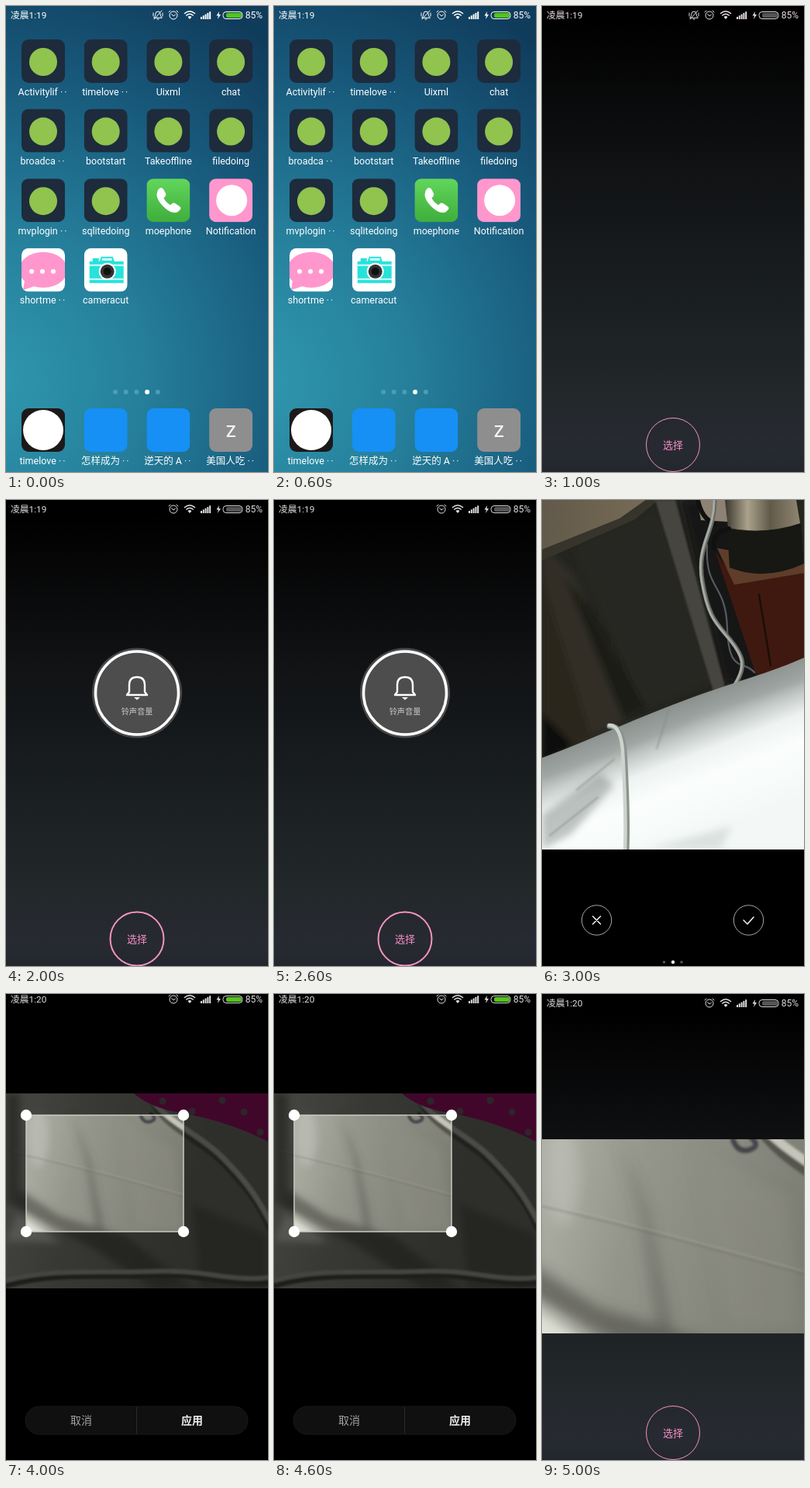
Recreate the animation shown at these times as an HTML page. Size 338 px wide and 600 px high, loop 6 s.

```html
<!DOCTYPE html>
<html lang="zh">
<head>
<meta charset="utf-8">
<title>Photo crop demo</title>
<style>
  html, body { margin: 0; width: 100%; height: 100%; overflow: hidden; background: #000; }
  svg { display: block; width: 100%; height: 100%; }
  text { font-family: Roboto, "Noto Sans CJK SC", "Noto Sans CJK", sans-serif; text-anchor: middle; }
  .line { fill: none; stroke-linecap: round; stroke-linejoin: round; }
  .dots { letter-spacing: 2px; }
</style>
</head>
<body>
<svg id="stage" viewBox="0 0 338 600">
  <defs>
    <radialGradient id="wallpaper" gradientUnits="userSpaceOnUse" cx="-20" cy="480" r="560">
      <stop offset="0" stop-color="#3098ae"/>
      <stop offset=".35" stop-color="#257f9b"/>
      <stop offset=".7" stop-color="#185a7c"/>
      <stop offset="1" stop-color="#103c5c"/>
    </radialGradient>
    <linearGradient id="night" x2="0" y2="1">
      <stop offset=".03" stop-color="#000"/>
      <stop offset=".35" stop-color="#111214"/>
      <stop offset=".5" stop-color="#15191c"/>
      <stop offset=".85" stop-color="#23282b"/>
      <stop offset=".95" stop-color="#272a32"/>
      <stop offset="1" stop-color="#23272d"/>
    </linearGradient>
    <linearGradient id="phone" x2="0" y2="1">
      <stop stop-color="#62d65c"/><stop offset="1" stop-color="#3eae3c"/>
    </linearGradient>
    <linearGradient id="bed" gradientUnits="userSpaceOnUse" x1="169" y1="265" x2="230" y2="425">
      <stop stop-color="#8b918e"/>
      <stop offset=".16" stop-color="#a9afac"/>
      <stop offset=".4" stop-color="#eef3f1"/>
      <stop offset=".6" stop-color="#fbfefd"/>
      <stop offset="1" stop-color="#f3f8f6"/>
    </linearGradient>
    <linearGradient id="wood">
      <stop stop-color="#61594a"/><stop offset="1" stop-color="#766b55"/>
    </linearGradient>
    <linearGradient id="steel">
      <stop stop-color="#3b372e"/><stop offset=".3" stop-color="#aaa28c"/>
      <stop offset=".6" stop-color="#615a49"/><stop offset="1" stop-color="#8f8670"/>
    </linearGradient>
    <linearGradient id="sheet" gradientUnits="userSpaceOnUse" x1="20" y1="180" x2="240" y2="240">
      <stop stop-color="#b0b1a7"/><stop offset=".35" stop-color="#95968b"/>
      <stop offset="1" stop-color="#7a7b71"/>
    </linearGradient>
    <filter id="soft" x="-30%" y="-30%" width="160%" height="160%"><feGaussianBlur stdDeviation="5"/></filter>
    <filter id="slight" x="-30%" y="-30%" width="160%" height="160%"><feGaussianBlur stdDeviation="1"/></filter>
    <clipPath id="tile"><rect width="56" height="56" rx="9"/></clipPath>
    <clipPath id="roomFrame"><path d="M0 0H338V450H0Z"/></clipPath>
    <clipPath id="fullFrame"><path d="M0 128H338V379H0Z"/></clipPath>
    <clipPath id="cropFrame"><path d="M0 187H338V437H0Z"/></clipPath>

    <g id="cloth">
      <path d="M0 128H338V379H0Z" fill="url(#sheet)"/>
      <g filter="url(#soft)">
        <ellipse cx="42" cy="185" rx="13" ry="38" fill="#ced0c7" opacity=".4"/>
        <path d="M18 252L70 286 155 312 240 379H190L110 326 15 276Z" fill="#50514a" opacity=".65"/>
        <path d="M15 282L40 298 70 320 0 318Z" fill="#e0e2d8"/>
        <path d="M82 150L102 210 116 306 128 306 108 210Z" fill="#55564f" opacity=".45"/>
        <path d="M145 165L170 300 230 306 215 200Z" fill="#8f9084" opacity=".4"/>
        <path d="M0 128H18V275L0 270ZM240 270L338 310V379H250Z" fill="#54564e" opacity=".6"/>
      </g>
      <g class="line" filter="url(#slight)">
        <path d="M10 202Q100 222 229 258" stroke="#c0c1b6" stroke-width="1.3" opacity=".25"/>
        <path d="M10 204Q100 224 229 260" stroke="#5f6058" stroke-width="1.3" opacity=".35"/>
        <path d="M192 140C210 173 253 187 281 216S326 265 342 301" stroke="#55554e" stroke-width="12"/>
        <path d="M188 136C211 167 250 181 278 209S322 257 340 292" stroke="#c4c4b9" stroke-width="7"/>
        <path d="M174 157Q178 167 187 164T187 154" stroke="#44444a" stroke-width="4"/>
        <path d="M0 373C65 355 125 363 190 360S290 374 338 369" stroke="#4d4d46" stroke-width="12"/>
        <path d="M0 369C65 352 125 360 190 357S290 371 338 365" stroke="#b4b5aa" stroke-width="6"/>
      </g>
      <path d="M165 128H338V190Q285 163 225 153 185 146 165 128Z" fill="#aa126e"/>
      <path d="M202 138h.1M240 151h.1M279 137h.1M307 152h.1M328 178h.1" class="line" stroke="#796071" stroke-width="9"/>
    </g>
  </defs>
</svg>

<script>
const stage = document.getElementById("stage");
const SCENE_MS = 1000;

const label = (x, y, size, fill, text, extra = "") =>
  `<text x="${x}" y="${y}" font-size="${size}" fill="${fill}" ${extra}>${text}</text>`;
const circle = (x, y, r, attrs) => `<circle cx="${x}" cy="${y}" r="${r}" ${attrs}/>`;
const line = (d, stroke, width = 1, extra = "") =>
  `<path class="line" d="${d}" stroke="${stroke}" stroke-width="${width}" ${extra}/>`;

function statusBar({ time = "1:19", color = "#dedede", level = "#555", muted = false, y = 0 }) {
  const bell = line("M191 15Q193 13 193 10Q193 7 196 7Q199 7 199 10Q199 13 201 15ZM195 17H197M190 9V13M202 9V13M191 17L201 6", color);
  return `<g transform="translate(0 ${y})">
    ${label(6, 16, 11.8, color, "凌晨" + time, 'style="text-anchor:start"')}
    ${muted ? bell : ""}
    ${circle(216, 12, 5, `fill="none" stroke="${color}"`)}
    ${line("M213.5 10.5L216 13L218.5 11M210 8L212 6M220 6L222 8", color)}
    ${line("M230.5 9.5Q237 4 243.5 9.5M232.8 12Q237 8.5 241.2 12", color, 1.6)}
    <path d="M234.5 14Q237 12 239.5 14L237 17Z" fill="${color}"/>
    ${[0, 1, 2, 3, 4].map(i => `<rect x="${251 + i * 2.8}" y="${14 - i * 1.7}" width="2" height="${3 + i * 1.7}" fill="${color}"/>`).join("")}
    <path d="M275 7L271.5 12.5H274L273 17L277 11H274.5Z" fill="${color}"/>
    <rect x="280" y="7.5" width="25" height="9" rx="4" fill="none" stroke="${color}"/>
    <rect x="284" y="9" width="20" height="6" rx="2" fill="${level}"/>
    ${label(320, 16, 12, color, "85%")}
  </g>`;
}

const tileArt = {
  app: `<path d="M0 0H56V56H0Z" fill="#1d2b3c"/>${circle(28, 29, 18, 'fill="#91c34f"')}`,
  phone: `<path d="M0 0H56V56H0Z" fill="url(#phone)"/>
    <path d="M14 16Q18 9 22 14L25 20Q25 23 22 25Q25 31 31 34Q34 30 37 32L43 36Q46 39 40 43Q34 46 25 39Q14 30 13 21Z" fill="#fff"/>`,
  notice: `<path d="M0 0H56V56H0Z" fill="#ff97cd"/>${circle(29, 28, 20, 'fill="#fff"')}`,
  message: `<path d="M0 0H56V56H0Z" fill="#fff"/><ellipse cx="28" cy="28" rx="31" ry="23" fill="#ff97cd"/>
    <path d="M4 42L2 54 20 48Z" fill="#ff97cd"/>
    ${[13, 27, 41].map(x => circle(x, 30, 3, 'fill="#fff"')).join("")}`,
  camera: `<path d="M0 0H56V56H0Z" fill="#fff"/>
    <path d="M7 17H11V13H19V17H20L22 11H37L39 17H51V45H7Z" fill="#27e2da"/>
    <path d="M7 21H51V23H7ZM7 39H51V41H7ZM23 13H36V16H23Z" fill="#d9ffff"/>
    ${circle(30, 30, 11, 'fill="#fff"')}${circle(30, 30, 9, 'fill="#333"')}${circle(30, 30, 5, 'fill="#111"')}`,
  hub: `<path d="M0 0H56V56H0Z" fill="#1d191a"/>${circle(28, 28, 26, 'fill="#fff"')}`,
  article: `<path d="M0 0H56V56H0Z" fill="#1690f5"/>`,
  letter: `<path d="M0 0H56V56H0Z" fill="#8e8e8e"/>${label(28, 37, 27, "#f4f4f4", "z")}`
};

const icon = (kind, name, column, y) => {
  const x = 20 + column * 80.7;
  const caption = name.replace("··", '<tspan class="dots">··</tspan>');
  return `<g transform="translate(${x} ${y})"><g clip-path="url(#tile)">${tileArt[kind]}</g></g>
    ${label(x + 28, y + 71.5, 12.5, "#fff", caption)}`;
};

function home() {
  const apps = ["Activitylif ··", "timelove ··", "Uixml", "chat", "broadca ··", "bootstart", "Takeoffline",
    "filedoing", "mvplogin ··", "sqlitedoing", "moephone", "Notification", "shortme ··", "cameracut"];
  const special = { 10: "phone", 11: "notice", 12: "message", 13: "camera" };
  const dock = [["hub", "timelove ··"], ["article", "怎样成为 ··"], ["article", "逆天的 A ··"], ["letter", "美国人吃 ··"]];
  return `<path d="M0 0H338V600H0Z" fill="url(#wallpaper)"/>
    ${statusBar({ color: "#fff", level: "#52c516", muted: true })}
    ${apps.map((name, i) => icon(special[i] || "app", name, i % 4, 43 + Math.floor(i / 4) * 89.6)).join("")}
    ${[0, 1, 2, 3, 4].map(i => circle(141 + i * 13.7, 497, 3, `fill="${i === 3 ? "#fff" : "#4b9db5"}"`)).join("")}
    ${dock.map(([kind, name], i) => icon(kind, name, i, 518)).join("")}`;
}

const picker = (status, content = "", ring = 1) => `
  <path d="M0 0H338V600H0Z" fill="url(#night)"/>
  ${statusBar(status)}${content}
  ${circle(169, 565, 34.5, `fill="none" stroke="#f593c4" stroke-width="${ring}"`)}
  ${label(169, 570, 13, "#f58fc3", "选择")}`;

const ringVolume = `
  ${circle(169, 248.5, 58, 'fill="#484848"')}
  ${circle(169, 248.5, 53.5, 'fill="#4d4d4d" stroke="#fff" stroke-width="3.6"')}
  ${line("M156 251H182L179 247V238Q179 228 169 228Q159 228 159 238V247Z", "#fff", 2.4)}
  <path d="M165 254H173L169 257.5Z" fill="#fff"/>
  ${label(169, 276, 10.2, "#c8c8c8", "铃声音量")}`;

const room = `<g clip-path="url(#roomFrame)">
  <path d="M0 0H338V450H0Z" fill="#24251f"/>
  <g filter="url(#soft)">
    <path d="M0 60L40 95 125 275 20 325 0 270Z" fill="#302f27"/>
    <path d="M0 100L65 310 0 335Z" fill="#2a261c"/>
    <path d="M40 60L150 10 225 230 130 272Z" fill="#272822"/>
    <path d="M30 100L70 150 135 270 105 282Z" fill="#1c1c17"/>
    <path d="M0 275L40 315 0 340Z" fill="#0d0d0b"/>
    <path d="M180 0H245L285 240 235 235Z" fill="#171714"/>
  </g>
  <path d="M0 0H134L100 24 0 64Z" fill="url(#wood)"/>
  <path d="M0 64L100 24 134 0H150L120 25 0 78Z" fill="#36342b"/>
  <path d="M146 0H172L236 240 221 246Z" fill="#46453f" filter="url(#slight)"/>
  <path d="M200 0H240V28L205 26Z" fill="#8d8274"/>
  <path d="M224 68L250 104 338 92V210L276 225Z" fill="#3f190f"/>
  <path d="M226 62L338 82V94L248 109Z" fill="#5f3d2b"/>
  ${line("M280 122L295 213", "#1c0e0a", 2.5)}
  <path d="M236 0H328L333 30Q290 45 240 36Z" fill="url(#steel)"/>
  <path d="M239 38Q290 45 334 30L338 82Q288 105 242 87Z" fill="#171713"/>
  ${line("M241 37Q218 42 222 62M201 0Q206 24 222 30", "#11110f", 6)}
  ${line("M213 58C210 118 237 105 239 165S260 205 274 222", "#555c60", 2.2)}
  ${line("M223 0C223 43 199 58 207 105S225 158 243 180 264 214 249 238", "#666b65", 5.5)}
  ${line("M222 0C222 43 198 58 206 105S224 158 242 180 263 214 248 238", "#a5aaa2", 3)}
  <path d="M0 332C65 308 130 277 200 252S290 224 338 203V450H0Z" fill="url(#bed)"/>
  <g filter="url(#soft)">
    <path d="M0 340L90 300 180 265 338 212V235L205 280 120 318 0 362Z" fill="#8c9290" opacity=".3"/>
    <path d="M0 405L75 352 93 367 38 430 0 450Z" fill="#848b89" opacity=".5"/>
    <path d="M140 448L245 420 230 450Z" fill="#a5aba8" opacity=".3"/>
  </g>
  ${line("M45 373L93 334M148 320L164 270M10 432L72 383", "#858c87", 2, 'filter="url(#slight)" opacity=".6"')}
  ${line("M87 291Q103 290 106 322C108 360 111 404 109 452", "#8b938e", 7)}
  ${line("M87 290Q101 290 104 322C106 360 109 404 107 452", "#ced4cd", 4.5)}
</g>`;

const confirmPhoto = `<path d="M0 0H338V600H0Z"/>${room}
  ${[70.5, 266.5].map(x => circle(x, 541, 19.2, 'fill="none" stroke="#aaa"')).join("")}
  ${line("M65.5 536L75.5 546M75.5 536L65.5 546M260 541L265 546L273 537", "#fff", 1.4)}
  ${[157.5, 169, 180].map((x, i) => circle(x, 595, i === 1 ? 2.2 : 1.8, `fill="${i === 1 ? "#fff" : "#555"}"`)).join("")}`;

const cropPhoto = `<path d="M0 0H338V600H0Z"/>
  ${statusBar({ time: "1:20", level: "#52c516", y: -5 })}
  <g clip-path="url(#fullFrame)"><use href="#cloth"/></g>
  <path d="M0 128H338V379H0ZM26 156V306H229V156Z" fill-rule="evenodd" opacity=".62"/>
  <path d="M26 156H229V306H26Z" fill="none" stroke="#c9c9c1" stroke-width="1.5"/>
  ${[26, 229].map(x => [156, 306].map(y => circle(x, y, 7.2, 'fill="#fff"')).join("")).join("")}
  <rect x="25" y="531" width="287" height="36" rx="18" fill="#101010" stroke="#181818"/>
  ${line("M168.5 532V566", "#292929")}
  ${label(97, 554, 14, "#a2a2a2", "取消")}
  ${label(240, 554, 14, "#eee", "应用", 'font-weight="700"')}`;

const croppedPhoto = `<g clip-path="url(#cropFrame)">
  <use href="#cloth" transform="translate(0 187) scale(1.666) translate(-26 -156)"/></g>`;

const scenes = [
  home(),
  picker({ color: "#eadde6", muted: true }),
  picker({}, ringVolume, 2),
  confirmPhoto,
  cropPhoto,
  picker({ time: "1:20" }, croppedPhoto)
];
stage.insertAdjacentHTML("beforeend", scenes.map(art => `<g class="scene">${art}</g>`).join(""));
const layers = [...stage.querySelectorAll(".scene")];

const start = performance.now();
function draw(now) {
  const current = Math.floor(Math.max(0, now - start) / SCENE_MS) % layers.length;
  layers.forEach((layer, i) => { layer.style.display = i === current ? "" : "none"; });
  requestAnimationFrame(draw);
}
draw(start);
</script>
</body>
</html>
```
